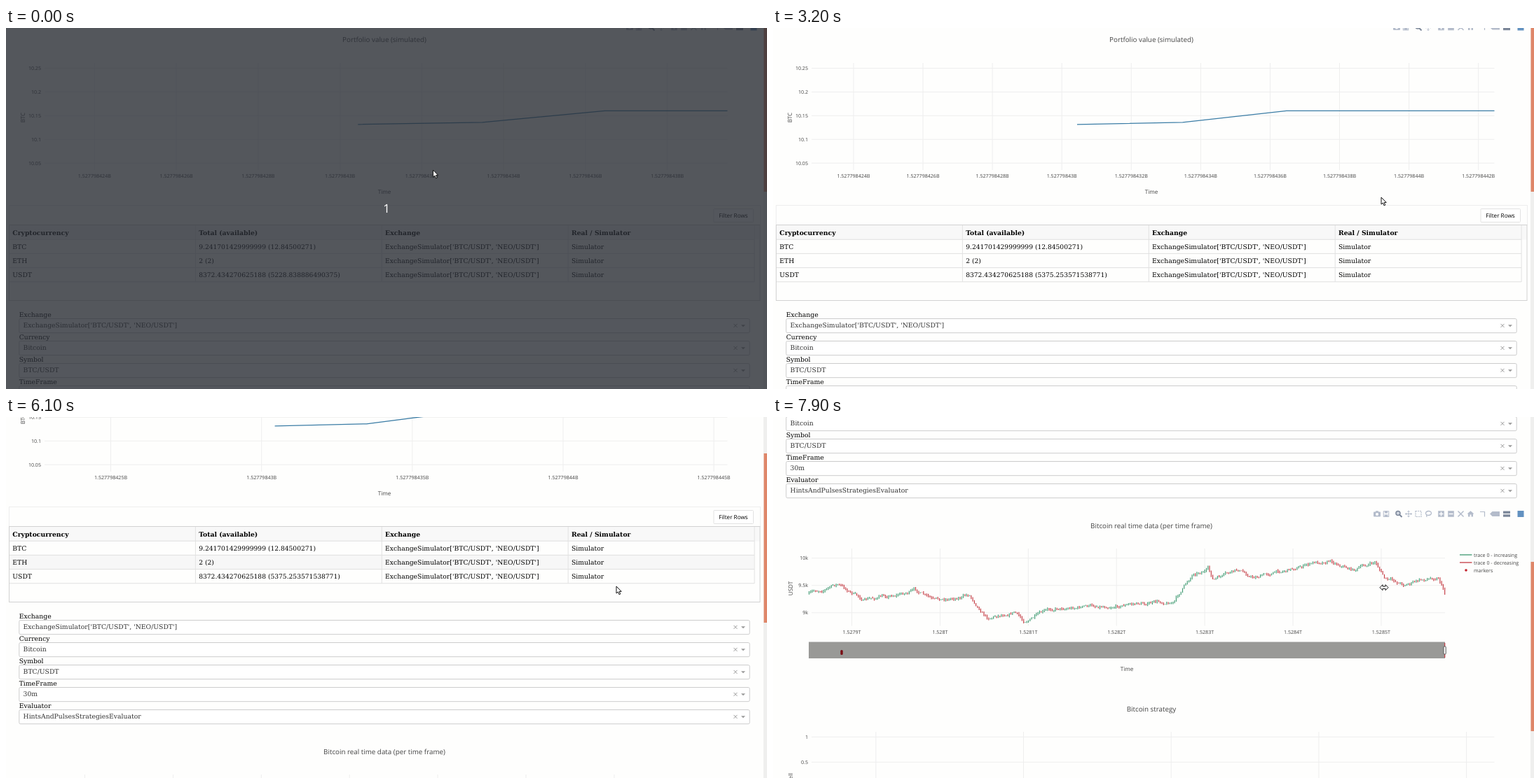
These frames come from a looping animation (1086x516 px, 8 s). An HTML page:

```html
<!DOCTYPE html>
<html lang="en">
<head>
<meta charset="utf-8">
<style>
  html, body { margin: 0; width: 100%; height: 100%; overflow: hidden; background: #fefefd; }
  svg { display: block; width: 1086px; height: 516px; }
  text { font-family: "Open Sans", sans-serif; fill: #444; text-rendering: geometricPrecision; white-space: pre; }
  .serif { font-family: "DejaVu Serif", serif; fill: #000; }
  .bold { font-weight: bold; }
  .value { fill: #333; }
  .button { fill: #000; }
  .grid { stroke: #eee; fill: none; }
</style>
</head>
<body>
<svg viewBox="0 0 1086 516">
  <g id="page">
    <g id="portfolio"></g>
    <g id="content"></g>
    <g id="bar1"></g>
    <g id="bar2"></g>
  </g>
  <rect x="1081" width="5" height="516" fill="#efefee"/>
  <rect id="thumb" x="1081.5" width="4.5" height="242" fill="#df8669"/>
  <g id="countdown">
    <rect width="1086" height="516" fill="#2a2e35" opacity=".8"/>
    <text x="543" y="264" font-size="17" text-anchor="middle" style="fill:#fff">1</text>
  </g>
  <path id="cursor" fill="#fff" stroke="#111" stroke-width="1"/>
</svg>
<script>
const LOOP = 8000, FRAME = 100;
const $ = id => document.getElementById(id);

// ---- drawing helpers ----
const text = (x, y, s, size = 7.1, anchor = 'start', cls = '') =>
  `<text x="${x}" y="${y}" font-size="${size}" text-anchor="${anchor}" class="${cls}">${s}</text>`;
const serif = (x, y, s, cls = '', size = 9.25) => text(x, y, s, size, 'start', 'serif ' + cls);
const rect = (x, y, w, h, fill = 'none', stroke = 'none', rx = 0) =>
  `<rect x="${x}" y="${y}" width="${w}" height="${h}" fill="${fill}" stroke="${stroke}" rx="${rx}"/>`;
const path = (d, stroke, width = 1, fill = 'none') =>
  `<path d="${d}" stroke="${stroke}" stroke-width="${width}" fill="${fill}"/>`;
const grid = d => `<path class="grid" d="${d}"/>`;
const title = (y, s) => text(540, y, s, 9.8, 'middle');
const axisTitle = (x, y, s) => text(x, y, s, 8.1, 'middle');
const sideTitle = (x, y, s, anchor = 'middle') =>
  `<g transform="translate(${x} ${y}) rotate(-90)">${text(0, 0, s, 8.1, anchor)}</g>`;
const rowTick = (y, right, s) => grid(`M55 ${y}H${right}`) + text(50, y + 2.6, s, 7.1, 'end');
const columnTick = (x, top, bottom, s) => grid(`M${x} ${top}V${bottom}`) + text(x, bottom + 11, s, 7.1, 'middle');

// ---- portfolio chart ----
const LEFT = 51, RIGHT = 1029.5, X_MIN = 422.71;

function portfolio(xMax, lastX) {
  const px = v => LEFT + (v - X_MIN) * (RIGHT - LEFT) / (xMax - X_MIN);
  const step = xMax - X_MIN < 22 ? 2 : 5;
  let out = title(20.4, 'Portfolio value (simulated)');
  for (let i = 0; i < 5; i++) out += rowTick(57.5 + i * 33.9, RIGHT, +(10.25 - i * .05).toFixed(2));
  for (let v = Math.ceil(X_MIN / step) * step; v <= xMax; v += step) {
    out += columnTick(px(v), 50, 203, +(1.527798 + v / 1e9).toFixed(9) + 'B');
  }
  return out + sideTitle(27, 128, 'BTC') + axisTitle(540, 236.6, 'Time') +
    path(`M${px(430.44)} 137.8L${px(433.48)} 134.8L${px(436.47)} 118.3H${px(lastX)}`, '#3a7ca5', 1.3);
}

// ---- table ----
const MARKET = "ExchangeSimulator['BTC/USDT', 'NEO/USDT']";

function table() {
  const rows = [
    ['Cryptocurrency', 'Total (available)', 'Exchange', 'Real / Simulator'],
    ['BTC', '9.241701429999999 (12.84500271)', MARKET, 'Simulator'],
    ['ETH', '2 (2)', MARKET, 'Simulator'],
    ['USDT', '<tspan id="total"></tspan>', MARKET, 'Simulator'],
  ];
  let out = rect(4.5, 253.5, 1072, 28, 'none', '#eee') + rect(1010, 258.5, 56.5, 19, '#fff', '#e2e2e2', 1) +
    text(1038, 271, 'Filter Rows', 8.2, 'middle', 'button') +
    rect(4.5, 281.5, 1071.5, 21, '#f8f8f8') + '<rect id="hover" x="4.5" y="322.5" width="1063" height="20" fill="#f7f7f7"/>';
  rows.forEach((row, r) => {
    const y = 295.6 + r * 20.2;
    out += path(`M4.5 ${y + 6.6}H1068`, '#e0e0e0');
    row.forEach((s, c) => {
      const numeric = r && c === 1;
      out += serif(9.3 + c * 265.9, y, s, r ? '' : 'bold', numeric ? 9.14 : 9.25);
    });
  });
  for (let c = 1; c <= 4; c++) out += path(`M${4.5 + c * 265.9} 281V363`, '#e2e2e2');
  return out + rect(4.5, 281.5, 1071.5, 108, 'none', '#d2d2d2');
}

// ---- dropdowns ----
function dropdowns() {
  const items = [['Exchange', MARKET], ['Currency', 'Bitcoin'], ['Symbol', 'BTC/USDT'],
    ['TimeFrame', '30m'], ['Evaluator', 'HintsAndPulsesStrategiesEvaluator']];
  return items.map(([label, value], i) => {
    const y = 415.5 + i * 32;
    return serif(18.7, y - 2.7, label) + rect(18.8, y, 1042.4, 20.2, '#fff', '#ccc', 2) +
      serif(24.6, y + 12.8, value, 'value') +
      path(`M1038.5 ${y + 7.4}l5 5m0 -5l-5 5`, '#999') + path(`M1049 ${y + 8.8}h6l-3 3z`, 'none', 0, '#999');
  }).join('');
}

// ---- candle chart ----
const GREEN = '#3d9970', RED = '#c43a42';
const TREND = [[51, 253], [92, 239], [130, 262], [204, 248], [230, 264], [280, 254], [306, 286], [345, 277],
  [357, 292], [405, 273], [500, 268], [572, 264], [600, 223], [621, 217], [628, 233], [664, 220], [685, 229],
  [794, 204], [828, 218], [860, 208], [874, 232], [900, 239], [950, 228], [960, 254]];

function trendAt(x) {
  const i = TREND.findIndex(p => p[0] > x);
  const [x0, y0] = TREND[i - 1], [x1, y1] = TREND[i];
  return y0 + (y1 - y0) * (x - x0) / (x1 - x0);
}

function candles() {
  let seed = 7, drift = 0, last = TREND[0][1], up = '', down = '';
  const random = () => (seed = seed * 16807 % 2147483647) / 2147483647;
  for (let x = 51.5; x < 959; x += 2.268) {
    drift = drift * .8 + (random() - .5) * 4;
    const close = trendAt(x) + drift;
    const top = Math.min(last, close) - .3 - random() * 1.8;
    const bottom = Math.max(last, close) + .3 + random() * 1.8;
    const bar = `M${x.toFixed(1)} ${top.toFixed(1)}V${bottom.toFixed(1)}`;
    if (close < last) up += bar; else down += bar;
    last = close;
  }
  return path(up, GREEN, 1.15) + path(down, RED, 1.15);
}

function realTime() {
  let out = title(159.4, 'Bitcoin real time data (per time frame)');
  for (let i = 0; i < 3; i++) out += rowTick(201.8 + i * 39, 959, 10 - i / 2 + 'k');
  for (let i = 0; i < 7; i++) out += columnTick(112.5 + i * 125.9, 188, 298.5, (15279 + i) / 1e4 + 'T');
  out += candles() + sideTitle(28, 245, 'USDT') + axisTitle(505, 362.6, 'Time');
  out += rect(51, 321.5, 908, 23.5, '#999997') + rect(96.3, 333, 3.4, 7, '#7a0d14', 'none', 1.5) +
    path('M958.7 323V344', RED, 1.2) + rect(957, 328, 3.2, 11, '#fff', '#555', 1);
  return out + path('M980 197H997.5', GREEN, 1.3) + path('M980 208H997.5', RED, 1.3) +
    '<circle cx="989" cy="219" r="1.8" fill="#c3202b"/>' +
    ['trace 0 - increasing', 'trace 0 - decreasing', 'markers'].map((s, i) => text(1000, 199.6 + i * 11, s)).join('');
}

function strategy() {
  let out = title(421.4, 'Bitcoin strategy') + rowTick(457.3, RIGHT, 1) + rowTick(493.3, RIGHT, .5);
  for (let i = 0; i < 5; i++) out += grid(`M${146.8 + i * 210.7} 450V600`);
  return out + sideTitle(28, 509, 'Buy or sell', 'end');
}

// ---- chart toolbars ----
function toolbar(y, full) {
  const pale = '#b4bccb', dark = '#7c8799', shift = full ? 0 : 28;
  const at = (x, body) => `<g transform="translate(${x} ${y})">${body}</g>`;
  const box = mark => rect(-4.3, -4.3, 8.6, 8.6, pale) + path(mark, '#fff', 1.5);
  const arrowHead = [0, 90, 180, 270].map(a => `<path transform="rotate(${a})" d="M0 0V-4.5M-1.5 -3L0 -4.5L1.5 -3" stroke="${pale}" fill="none"/>`).join('');
  let out = at(862 + shift, rect(-5, -3, 10, 7, pale, 'none', 1) + rect(-2, -4.2, 4, 2, pale) + '<circle r="2" cy=".5" fill="#fff"/>') +
    at(875 + shift, rect(-3.7, -3.7, 7.4, 7.6, 'none', pale) + rect(-2, -4, 4, 3, pale) + rect(-2.4, 1, 4.8, 3, pale)) +
    at(893 + shift, `<circle cx="-1" cy="-1" r="3" fill="#cfd5df" stroke="${dark}" stroke-width="1.5"/>` + path('M1 1L4.5 4.5', dark, 2)) +
    at(907 + shift, arrowHead);
  if (full) {
    out += at(921, `<rect x="-4" y="-4" width="8" height="8" fill="none" stroke="${pale}" stroke-width="1.2" stroke-dasharray="2 1"/>`) +
      at(935.5, `<ellipse cy="-1" rx="4" ry="3" fill="none" stroke="${pale}" stroke-width="1.3"/>` + path('M-3 1L-2.5 4.5', pale, 1.2));
  }
  return out + at(953.5, box('M-3 0H3M0 -3V3')) + at(967.5, box('M-3 0H3')) +
    at(981.5, path('M-4 -4L4 4M4 -4L-4 4', pale, 1.5)) +
    at(995.5, path('M-5 0L0 -4.3L5 0H3.5V4H1V1H-1V4H-3.5V0Z', 'none', 0, pale)) +
    at(1013, path('M-4 -3H2.5V4', pale, 1.2)) +
    at(1030, path('M-7 0L-3.5 -3.5H7V3.5H-3.5Z', 'none', 0, pale)) +
    at(1047, rect(-5, -4, 10, 3.4, dark) + rect(-5, .8, 10, 3.4, dark)) +
    at(1067, rect(-4.5, -4.5, 9, 9, '#6291c0'));
}

$('content').innerHTML = table() + dropdowns() + `<g transform="translate(0 448)">${realTime() + strategy()}</g>`;
$('bar1').innerHTML = toolbar(-1, false);
$('bar2').innerHTML = toolbar(586.5, true);

// ---- motion ----
const progress = (t, start, length) => Math.min(1, Math.max(0, (t - start) / length));
const cubicInOut = f => f < .5 ? 4 * f ** 3 : 1 - 4 * (1 - f) ** 3;
const sineInOut = f => (1 - Math.cos(Math.PI * f)) / 2;
const quadOut = f => 1 - (1 - f) ** 2;

// Each wheel turn: start time, notches of 57 px.
const WHEEL = [[5620, 2], [6000, 1], [6978, 2], [7280, 1], [7610, 2]];
const scrollAt = t => Math.round(WHEEL.reduce((sum, [start, notches]) =>
  sum + 57 * notches * sineInOut(progress(t, start, 350)), 0));

// Each mouse move: start time, length, dx, dy.
const MOVES = [[100, 600, 41, -3.5], [1200, 200, 0, 15], [1900, 1300, 217.5, 27.5], [5100, 200, 3, 0]];
const pointerAt = t => MOVES.reduce(([x, y], [start, length, dx, dy]) => {
  const f = quadOut(progress(t, start, length));
  return [x + dx * f, y + dy * f];
}, [609.5, 203]);

const ARROW = 'M0 0V10L2.4 8L4.1 11.8L5.8 11L4.1 7.4H7.2Z';
const RESIZE = 'M-5 1.7L-1 -2.3V.1H3V-2.3L7 1.7L3 5.7V3.3H-1V5.7Z';

function draw(t) {
  // A new value widens the axis first; the line reaches it once the axis has settled.
  const widen = start => 2.99 * cubicInOut(progress(t, start, 563));
  const xMax = 439.47 + widen(1740) + widen(4644);
  const lastX = 439.47 + 2.99 * ((t >= 2400) + (t >= 5300));
  $('portfolio').innerHTML = portfolio(xMax, lastX);
  $('total').textContent = `8372.434270625188 (${t < 1800 ? '5228.838886490375' : '5375.253571538771'})`;

  const show = (id, on) => $(id).style.display = on ? '' : 'none';
  const scroll = scrollAt(t);
  $('page').setAttribute('transform', `translate(0 ${-scroll})`);
  $('thumb').setAttribute('y', -8 + scroll * .48);
  show('hover', scroll > 60 && scroll < 150);
  show('bar2', scroll > 330);
  show('countdown', t < 200);

  const [x, y] = pointerAt(t);
  const overAxis = t >= 200 && y < 217, overCandles = scroll > 392;
  $('cursor').setAttribute('d', overAxis || overCandles ? RESIZE : ARROW);
  $('cursor').setAttribute('transform', `translate(${x} ${y})`);
}

let shown = -1;
function frame() {
  const t = Math.floor(performance.now() % LOOP / FRAME) * FRAME;
  if (t !== shown) draw(shown = t);
  requestAnimationFrame(frame);
}
frame();
</script>
</body>
</html>
```
